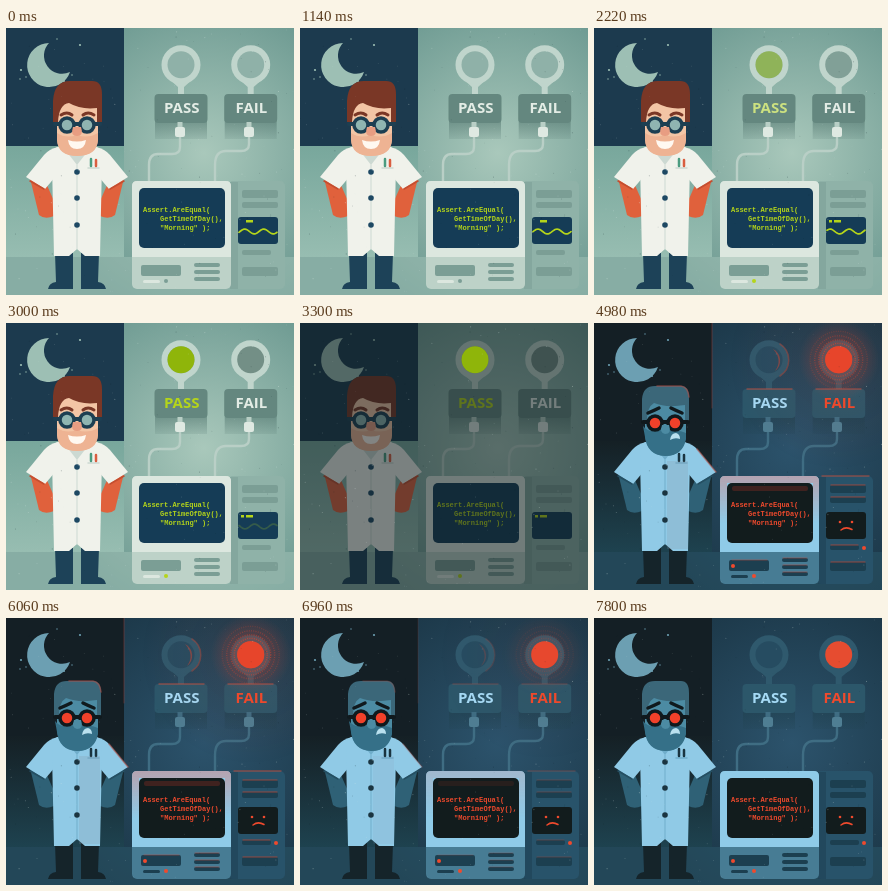
Animation, 288 px wide and 267 px high, one loop 8040 ms. Source, as an HTML page:

```html
<!DOCTYPE html>
<html lang="en">
<head>
<meta charset="utf-8">
<title>Unit test at night</title>
<style>
  html, body { margin: 0; width: 100%; height: 100%; overflow: hidden; background: #10202a; }
  svg { display: block; width: 100vw; height: 100vh; }
  .code { font: bold 7px "Liberation Mono", monospace; white-space: pre; }
  .label { font: bold 15px "Open Sans", sans-serif; text-anchor: middle; }
</style>
</head>
<body>
<svg id="stage" viewBox="0 0 288 267"></svg>
<script>
const LOOP = 8040, STEP = 60, NIGHT_START = 3420, PULSE = 1080;

const day = {
  id: 'day', sky: '#1c3a4e', near: '#a9c8bb', far: '#6b9890', wallTop: '#78a79c', wallEnd: '#97bdb1',
  floor: '#9fc0b4', moon: '#9dbfb4', hair: '#7a3726', face: '#f3c5a5', beard: '#eeb393',
  frame: '#1d3f52', lens: '#8fb5b1', coat: '#f0f2eb', fold: '#ccd9d2', glove: '#e0613c',
  cuff: '#c44e30', trousers: '#1d4258', button: '#1d4863', ring: '#c0d5cc', glass: '#8fb1a8',
  box: '#64877f', boxEdge: '#547770', label: '#e3ece5', plug: '#dfe9e2', cable: '#b9cfc6',
  front: '#dce7df', body: '#bdd2c8', screen: '#153c56', code: '#b5d51a', tower: '#8fb2a8', slot: '#7b9e95'
};

const night = {
  id: 'night', sky: '#141f25', near: '#2c536c', far: '#1b3646', wallTop: '#152025', wallEnd: '#1e424f',
  floor: '#2a5669', moon: '#6c9fb2', hair: '#3b6779', face: '#4c8ba3', beard: '#357088',
  frame: '#10191d', lens: '#f0412a', coat: '#90cae6', fold: '#70aecb', glove: '#2f6176',
  cuff: '#254f62', trousers: '#15242a', button: '#1a3440', ring: '#2f596d', glass: '#264c61',
  box: '#2c576a', boxEdge: '#20414f', label: '#a5daf5', plug: '#4f7e93', cable: '#3f6d83',
  front: '#8fcbe8', body: '#477c94', screen: '#121c1d', code: '#ef4a2d', tower: '#28536a', slot: '#1c3f50'
};

const rect = (x, y, w, h, fill, r = 0, extra = '') =>
  `<rect x="${x}" y="${y}" width="${w}" height="${h}" rx="${r}" fill="${fill}" ${extra}/>`;
const circle = (x, y, r, fill, extra = '') =>
  `<circle cx="${x}" cy="${y}" r="${r}" fill="${fill}" ${extra}/>`;
const path = (d, fill, extra = '') => `<path d="${d}" fill="${fill}" ${extra}/>`;
const line = (d, color, width, extra = '') =>
  path(d, 'none', `stroke="${color}" stroke-width="${width}" stroke-linecap="round" ${extra}`);
const text = (x, y, cls, fill, value, id = '') =>
  `<text x="${x}" y="${y}" class="${cls}" fill="${fill}" id="${id}">${value}</text>`;
const mirror = shape => shape + `<g transform="translate(142 0) scale(-1 1)">${shape}</g>`;
const fadeDown = (id, from, to, endOpacity = 1) =>
  `<linearGradient id="${id}" x2="0" y2="1"><stop stop-color="${from}"/>
    <stop offset="1" stop-color="${to}" stop-opacity="${endOpacity}"/></linearGradient>`;

function random(seed) {
  return () => (seed = (seed * 16807) % 2147483647) / 2147483647;
}

function speckles() {
  const next = random(71);
  let dots = '';
  for (let i = 0; i < 150; i++) {
    dots += circle((next() * 288).toFixed(1), (next() * 267).toFixed(1),
      (0.25 + next() * 0.35).toFixed(2), i % 3 ? '#e6f2ec' : '#10252c', 'opacity=".3"');
  }
  return dots;
}

function background(p) {
  const stars = [[15, 42], [20, 49], [14, 51], [58, 53], [66, 47], [51, 11], [74, 17]];
  return `<radialGradient id="${p.id}Room" gradientUnits="userSpaceOnUse" cx="198" cy="125" r="165">
      <stop stop-color="${p.near}"/><stop offset="1" stop-color="${p.far}"/></radialGradient>` +
    fadeDown(p.id + 'Wall', p.wallTop, p.wallEnd) +
    rect(0, 0, 288, 267, `url(#${p.id}Room)`) +
    rect(0, 118, 118, 111, `url(#${p.id}Wall)`) +
    rect(0, 229, 288, 38, p.floor, 0, 'opacity=".55"') +
    rect(0, 0, 118, 118, p.sky) +
    path('M43 15A22 22 0 1 0 64 44A18.2 18.2 0 0 1 43 15Z', p.moon) +
    stars.map(([x, y], i) => circle(x, y, i % 3 ? 0.7 : 1.1, p.moon)).join('');
}

function head(p) {
  const eyeY = p === day ? 97 : 100;
  const goggles = line(`M49 ${eyeY - 1}H94`, p.frame, 4) +
    [61, 81].map(x => circle(x, eyeY, 7, p.lens, `stroke="${p.frame}" stroke-width="3.5"`)).join('');
  if (p === day) {
    return path('M51 73H92V111Q91 127 71 128Q52 127 51 111Z', p.face) +
      path('M51 105Q60 111 71 107Q82 111 92 105V112Q91 128 71 128Q52 128 51 112Z', p.beard) +
      path('M47 94V73Q48 53 64 53H86Q96 53 96 66V94H91V80Q75 82 63 75Q53 76 52 94Z', p.hair) +
      line('M55 87Q61 83 66 87M77 87Q82 83 88 87', p.hair, 3) + goggles +
      path('M67 99H75Q78 108 71 108Q64 108 67 99Z', '#e89d82') +
      path('M62 112Q71 115 80 112Q79 121 71 121Q63 121 62 112Z', '#fff8f0');
  }
  return path('M51 76H92V112Q90 133 71 133Q53 132 51 112Z', p.face) +
    path('M49 103Q55 111 67 107Q80 105 92 110V116Q89 133 71 133Q53 132 51 114Z', p.beard) +
    path('M48 98V76Q49 63 61 63H87Q95 63 95 75V98H91V82Q72 85 60 80Q53 84 53 98Z', p.hair) +
    line('M54 90Q59 88 65 85M77 85Q83 88 88 90', p.frame, 3.5) + goggles +
    path('M68 102H75Q78 111 71 111Q65 110 68 102Z', p.face) +
    path('M76 117Q77 110 82 110Q86 111 86 116Q81 114 76 117Z', '#b9e0ee');
}

function scientist(p) {
  const arm = path('M24 150L40 155L48 173V188Q39 192 33 187Z', p.glove) +
    path('M52 119Q43 121 38 127L20 149L39 161L50 148Z', p.coat) +
    line('M24 153L38 161', p.cuff, 1.5);
  const leg = path('M49 225H67V261H42Q43 255 50 254Z', p.trousers);
  return mirror(arm) + mirror(leg) +
    path('M51 119H91Q96 122 96 135L94 228H79L71 221L63 228H48L46 135Q46 122 51 119Z', p.coat) +
    path('M57 119L71 137L85 119Z', p.fold) +
    line('M71 137V221', p.fold, 1) +
    line('M82 140H93', p.fold, 1.5) +
    line('M85 131V138', p === day ? '#4b9c80' : p.button, 2.5) +
    line('M90 132V138', p === day ? '#d95e40' : p.button, 2.5) +
    [144, 170, 197].map(y => circle(71, y, 2.8, p.button)).join('') + head(p);
}

function lamp(p, x, word) {
  const lit = word === 'FAIL' && p === night;
  return path(`M${x - 13} 50L${x - 3} 59V67H${x + 3}V59L${x + 13} 50Z`, p.ring) +
    circle(x, 36.8, 19.5, p.ring) +
    circle(x, 36.8, 13.5, lit ? '#e64c30' : p.glass, `id="${p.id}${word}Lamp"`) +
    rect(x - 26, 92, 52, 19, `url(#${p.id}Shadow)`, 0, 'opacity=".6"') +
    rect(x - 26.5, 66, 53, 29, p.box, 4) +
    text(x + 0.7, 85, 'label', lit ? p.code : p.label, word, p.id + word);
}

function computer(p) {
  const slots = rect(236, 162, 36, 8, p.slot, 2) + rect(236, 174, 36, 6, p.slot, 2) +
    rect(236, 222, 29, 5, p.slot, 2) + rect(236, 239, 36, 9, p.slot, 2);
  const vents = [235, 242, 249].map(y => rect(188, y, 26, 4, p.slot, 2)).join('');
  const face = p === day
    ? rect(240, 192, 7, 2.5, p.code) + rect(235, 192, 3, 2.5, p.code, 0, 'id="block"') +
      line('', p.code, 1.7, 'id="wave"')
    : circle(246, 199, 1.3, p.code) + circle(258, 199, 1.3, p.code) +
      line('M247 207Q252 203 258 206.5', p.code, 1.5);
  const leds = p === day
    ? circle(160, 253, 2, p.slot, 'id="led"') + rect(137, 252, 17, 3, p.front, 1.5)
    : circle(139, 243, 2, p.code) + circle(160, 253, 2, p.code) +
      rect(137, 252, 17, 3, p.slot, 1.5) + circle(270, 225, 2, p.code);
  return line('M174 108V119Q174 126 166 126H152Q143 126 143 137V153', p.cable, 2.4) +
    line('M243 108V116Q243 123 235 123H220Q209 123 209 137V153', p.cable, 2.4) +
    [174, 243].map(x => rect(x - 2.5, 94, 5, 6, p.cable) + rect(x - 5, 99, 10, 10, p.plug, 2)).join('') +
    rect(222, 153, 57, 108, p.tower, 5) + rect(224, 154, 8, 107, p.slot, 0, 'opacity=".5"') + slots +
    rect(232, 189, 40, 27, p.screen, 3) + face +
    rect(126, 153, 99, 108, p.body, 5) +
    path('M126 229V158Q126 153 131 153H220Q225 153 225 158V229Z', p.front) +
    rect(133, 160, 86, 60, p.screen, 5) +
    rect(135, 237, 40, 11, p.slot, 2) + vents + leds +
    text(137, 184, 'code', p.code, 'Assert.AreEqual(') +
    text(154, 193, 'code', p.code, 'GetTimeOfDay(),') +
    text(154, 202, 'code', p.code, '"Morning" );');
}

function redGlow() {
  const red = '#d9452e';
  const x = 244.7, y = 36.8;
  const rings = [16.5, 20, 24, 28.5].map((r, i) => circle(x, y, r, 'none',
    `stroke="${red}" stroke-width="1.3" stroke-dasharray="1 1.3" opacity="${0.8 - i * 0.17}"`)).join('');
  return `<radialGradient id="halo"><stop stop-color="${red}" stop-opacity=".5"/>
      <stop offset="1" stop-color="${red}" stop-opacity="0"/></radialGradient>` +
    fadeDown('blush', '#c98f94', '#c98f94', 0) +
    '<g id="glow">' +
    circle(x, y, 115, 'url(#halo)', 'opacity=".18"') +
    circle(x, y, 40, 'url(#halo)') + rings + circle(x, y, 13.5, '#e8452c') +
    path('M179 26A13 13 0 0 1 181 48Q189 37 179 26Z', '#a8473c', 'opacity=".75"') +
    line('M186 21A19 19 0 0 1 186 53', '#a8473c', 1.5, 'opacity=".6"') +
    path('M126 200V158Q126 153 131 153H220Q225 153 225 158V200H219V160H133V200Z', 'url(#blush)', 'opacity=".75"') +
    rect(138, 163, 76, 5, '#7a2c24', 2, 'opacity=".5"') +
    rect(73, 138, 21, 88, '#8b8ea0', 0, 'opacity=".22"') +
    line('M153 66H198M222 66H267M228 153H275', '#c9513f', 1.4, 'opacity=".65"') +
    line('M237 162H271M237 174H271M237 222H264M237 239H271', '#b4483b', 1.3, 'opacity=".6"') +
    line('M63 63H87Q94 64 95 74M103 126L122 149', '#b4534b', 1.6, 'opacity=".65"') +
    line('M118 0V85', '#9a4038', 1, 'opacity=".55"') +
    line('M138 237H173M189 235H213M189 242H213M189 249H213', '#bd4b3d', 1, 'opacity=".6"') + '</g>';
}

const scene = p => `<g id="${p.id}">` + fadeDown(p.id + 'Shadow', p.boxEdge, p.boxEdge, 0.25) +
  background(p) + scientist(p) + lamp(p, 175, 'PASS') + lamp(p, 244.7, 'FAIL') + computer(p);

const $ = id => document.getElementById(id);
$('stage').setAttribute('preserveAspectRatio', 'none');
$('stage').innerHTML =
  scene(day) + rect(0, 0, 288, 267, '#101c1f', 0, 'id="shade"') +
  circle(175, 36.8, 13.5, '#8fb50a', 'id="passLight"') + '</g>' +
  scene(night) + redGlow() + '</g>' + speckles();

const clamp = v => Math.max(0, Math.min(1, v));
const smooth = v => v * v * (3 - 2 * v);
const channels = hex => [1, 3, 5].map(i => parseInt(hex.slice(i, i + 2), 16));
function mix(a, b, k) {
  const end = channels(b);
  return `rgb(${channels(a).map((v, i) => Math.round(v + (end[i] - v) * k))})`;
}

function wavePath(t) {
  let d = '';
  for (let x = 233; x <= 271; x++) {
    const y = 203.5 + 2.4 * Math.sin((x - 233) / 19 * 2 * Math.PI - t / 190 + 2.8);
    d += `${d ? 'L' : 'M'}${x} ${y.toFixed(2)}`;
  }
  return d;
}

function render(t) {
  const isNight = t >= NIGHT_START;
  $('day').setAttribute('display', isNight ? 'none' : 'inline');
  $('night').setAttribute('display', isNight ? 'inline' : 'none');
  if (isNight) {
    const phase = (t - NIGHT_START - STEP) / PULSE;
    $('glow').setAttribute('opacity', (1 - Math.cos(phase * 2 * Math.PI)) / 2);
    return;
  }
  const pass = smooth(clamp((t - 1740) / 960));
  $('passLight').setAttribute('opacity', pass);
  $('dayPASS').setAttribute('fill', mix(day.label, '#b5d51a', pass));
  $('dayFAILLamp').setAttribute('fill', mix(day.glass, '#738f86', pass));
  $('shade').setAttribute('opacity', 0.52 * Math.max(0, t - 3120) / 180);
  $('wave').setAttribute('d', wavePath(t));
  $('wave').setAttribute('opacity', 1 - clamp((t - 2760) / 300));
  const blink = Math.floor(t / 420) % 2;
  $('led').setAttribute('fill', blink ? day.code : day.slot);
  $('block').setAttribute('opacity', blink);
}

const start = performance.now();
function tick() {
  const t = (performance.now() - start) % LOOP;
  render(Math.min(7800, Math.floor(t / STEP) * STEP));
  requestAnimationFrame(tick);
}
render(0);
requestAnimationFrame(tick);
</script>
</body>
</html>
```
